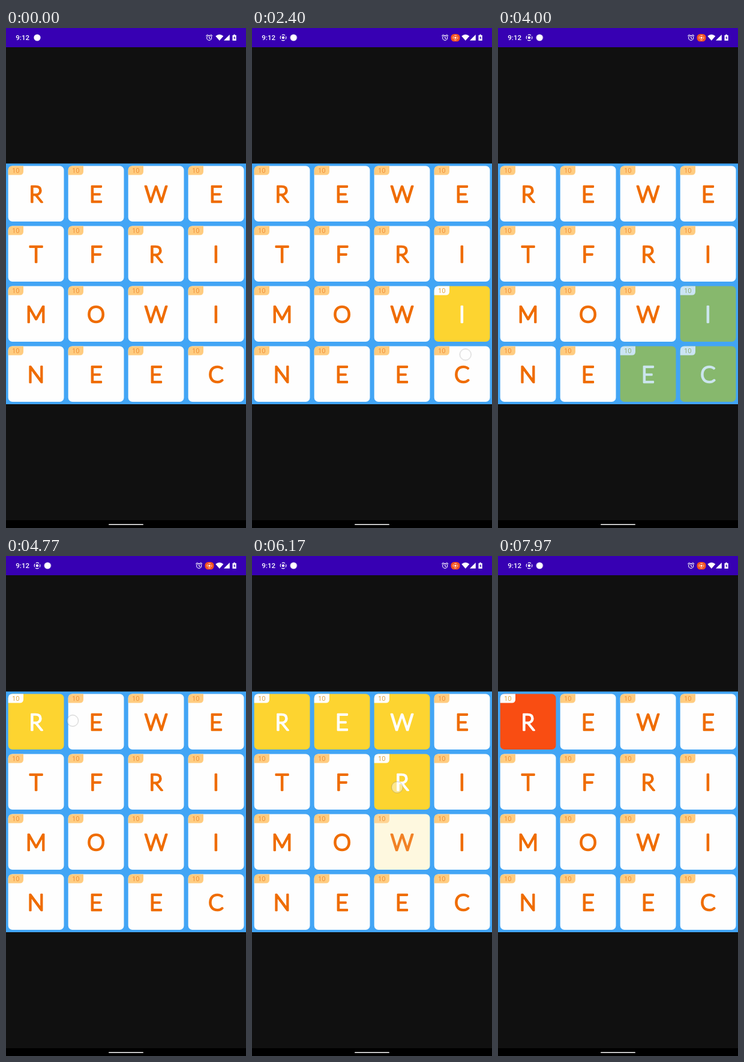
Recreate the animation shown at these times as an HTML page. Size 400x832 px, loop 8 s.

```html
<!DOCTYPE html>
<html lang="en">
<head>
<meta charset="utf-8">
<title>Word grid</title>
<style>
  html, body { margin: 0; width: 100%; height: 100%; overflow: hidden; background: #101010; }
  svg { display: block; width: 100%; height: 100%; }
  text { text-anchor: middle; }
  .letter { font: 300 37.5px Lato, "Open Sans", sans-serif; stroke-width: 2.6; stroke-linejoin: round; }
  .points { font: 400 11px "Open Sans", "Noto Sans", sans-serif; }
  .clock { font: 500 11.5px Roboto, Inter, sans-serif; text-anchor: start; }
</style>
</head>
<body>
<svg viewBox="0 0 400 832" xmlns="http://www.w3.org/2000/svg">
  <rect width="400" height="832" fill="#101010"/>
  <rect width="400" height="32" fill="#3700b3"/>
  <rect y="819" width="400" height="13" fill="#000"/>
  <rect x="171" y="825.5" width="58" height="1.6" rx=".8" fill="#fff"/>

  <g fill="#fff">
    <text class="clock" x="16.3" y="20">9:12</text>
    <g id="rec">
      <circle cx="52" cy="16" r="4.8" fill="none" stroke="#fff" stroke-width="1.2" stroke-dasharray="5.5 2.04" stroke-dashoffset="2.75"/>
      <circle cx="52" cy="16" r="2.3"/>
    </g>
    <circle id="app" cx="52" cy="16" r="5.6"/>
    <g id="alarm" fill="none" stroke="#fff" stroke-width="1.1" stroke-linecap="round">
      <circle cx="338.7" cy="16.4" r="4"/>
      <path d="M338.7 14v2.6l1.7 1.1M333.7 13.2l2.3-2M343.7 13.2l-2.3-2"/>
    </g>
    <g id="chip">
      <rect x="331.5" y="10" width="15" height="12.5" rx="5.5" fill="#f4511e"/>
      <circle cx="339" cy="16.2" r="3.8" fill="none" stroke="#ffd9c8" stroke-width="1" stroke-dasharray="4.4 1.57" stroke-dashoffset="2.2"/>
      <circle cx="339" cy="16.2" r="1.8" fill="#ffe6dc"/>
    </g>
    <path d="M349.3 13.4Q355.8 8.2 362.3 13.4L355.8 21Z"/>
    <path d="M372.8 11V20.8H363Z"/>
    <path d="M379.3 10.8h2.6v1.2h1.8v9h-6.2v-9h1.8Z"/>
    <path d="M381.2 13.2l-2 3.6h1.2v2.8l2-3.7h-1.2Z" fill="#3700b3"/>
  </g>

  <rect y="225.5" width="400" height="400.5" fill="#42a5f5"/>
  <g id="board"></g>
  <g id="finger" opacity="0">
    <circle r="9.4" fill="#fff" fill-opacity=".45" stroke="#555" stroke-opacity=".4" stroke-width=".8"/>
  </g>
</svg>
<script>
const LOOP = 8000, CELL = 100, TOP = 225.5, MARGIN = 22;
const LETTERS = "REWETFRIMOWINEEC", WORDS = ["ICE"];
const $ = id => document.getElementById(id);

// steps: [time in ms, value]; values hold before the first and after the last
function play(el, prop, steps, easing = "linear") {
  const all = [[0, steps[0][1]], ...steps, [LOOP, steps[steps.length - 1][1]]];
  el.animate(all.map(([t, v]) => ({ offset: t / LOOP, [prop]: v, easing })),
    { duration: LOOP, iterations: Infinity });
}

function make(parent, tag, attrs, label) {
  const el = document.createElementNS("http://www.w3.org/2000/svg", tag);
  for (const k in attrs) el.setAttribute(k, attrs[k]);
  if (label) el.textContent = label;
  return parent.appendChild(el);
}

// colours of tile, letter, tab and points
const LOOK = {
  idle:  ["#fefefe", "#ef6c00", "#ffcc80", "#f08a30"],
  drag:  ["#fdd430", "#fefefe", "#fefefe", "#dfa030"],
  right: ["#86b86c", "#cbe6ee", "#cbe4f4", "#8fae70"],
  wrong: ["#f94d12", "#fefefe", "#fefefe", "#dfa030"]
};

// turning points of each drag: [time, x, y]
const DRAGS = [
  [[1930, 369, 451], [2670, 350, 583], [3030, 244, 588], [3270, 234, 587]],
  [[4630, 52, 276], [5000, 234, 270], [5670, 258, 494], [6730, 223, 256], [7740, 53, 276]]
];

function fingerAt(points, t) {
  let i = 1;
  while (i < points.length - 1 && t > points[i][0]) i++;
  const [a, b] = [points[i - 1], points[i]];
  const u = (t - a[0]) / (b[0] - a[0]), s = u * u * (3 - 2 * u);
  return [a[1] + (b[1] - a[1]) * s, a[2] + (b[2] - a[2]) * s];
}

// index of the tile under the finger, or -1 near the tile edges
function hit(x, y) {
  const inside = v => v % CELL > MARGIN && v % CELL < CELL - MARGIN;
  y -= TOP;
  return inside(x) && inside(y) ? Math.floor(y / CELL) * 4 + Math.floor(x / CELL) : -1;
}

const moves = [...LETTERS].map(() => []); // per tile: [time, look, fade]
function setLook(t, tile, look, fade = 60) {
  const list = moves[tile], last = list.length ? list[list.length - 1][1] : "idle";
  if (last !== look) list.push([t, look, fade]);
}

// replay the drags: a new tile extends the word, going back shortens it
const track = [], shown = [];
for (const points of DRAGS) {
  const start = points[0][0], end = points[points.length - 1][0];
  const chain = [];
  const isWord = () => WORDS.includes(chain.map(i => LETTERS[i]).join(""));
  for (let t = start; t <= end; t += 10) {
    const [x, y] = fingerAt(points, t);
    track.push([t, `translate(${x}px, ${y}px)`]);
    const tile = hit(x, y);
    if (tile < 0) continue;
    if (tile === chain[chain.length - 2]) setLook(t, chain.pop(), "idle");
    else if (!chain.includes(tile)) chain.push(tile);
    for (const i of chain) setLook(t, i, isWord() ? "right" : "drag");
  }
  for (const i of chain) {
    if (!isWord()) setLook(end, i, "wrong", 100);
    if (end + 730 < LOOP) setLook(end + 730, i, "idle", 160);
  }
  shown.push([start, 0], [start, 1], [end - 280, 1], [end, 0]);
}
play($("finger"), "transform", track);
play($("finger"), "opacity", shown);

[...LETTERS].forEach((ch, i) => {
  const x = 3.7 + CELL * (i % 4), y = TOP + 4 + CELL * Math.floor(i / 4);
  const g = make($("board"), "g", { transform: `translate(${x} ${y})` });
  const parts = [
    make(g, "rect", { width: 92.8, height: 92.6, rx: 7 }),
    make(g, "text", { class: "letter", x: 46.3, y: 60.4 }, ch),
    make(g, "path", { d: "M0 15V7Q0 0 7 0H25.3V9Q25.3 15 19.3 15Z" }),
    make(g, "text", { class: "points", x: 12.6, y: 11.6 }, "10")
  ];
  parts.forEach((el, p) => {
    let now = LOOK.idle[p];
    const steps = [[0, now]];
    for (const [t, look, fade] of moves[i]) {
      steps.push([t, now], [t + fade, now = LOOK[look][p]]);
    }
    for (const prop of p === 1 ? ["fill", "stroke"] : ["fill"]) {
      el.setAttribute(prop, LOOK.idle[p]);
      if (moves[i].length) play(el, prop, steps);
    }
  });
});

// recording indicators slide in
const slide = (id, dx) => play($(id), "transform",
  [[30, "translateX(0px)"], [480, `translateX(${dx}px)`]], "ease-in-out");
slide("app", 17.3);
slide("alarm", -17);
for (const id of ["rec", "chip"]) play($(id), "opacity", [[130, 0], [400, 1]]);
</script>
</body>
</html>
```
